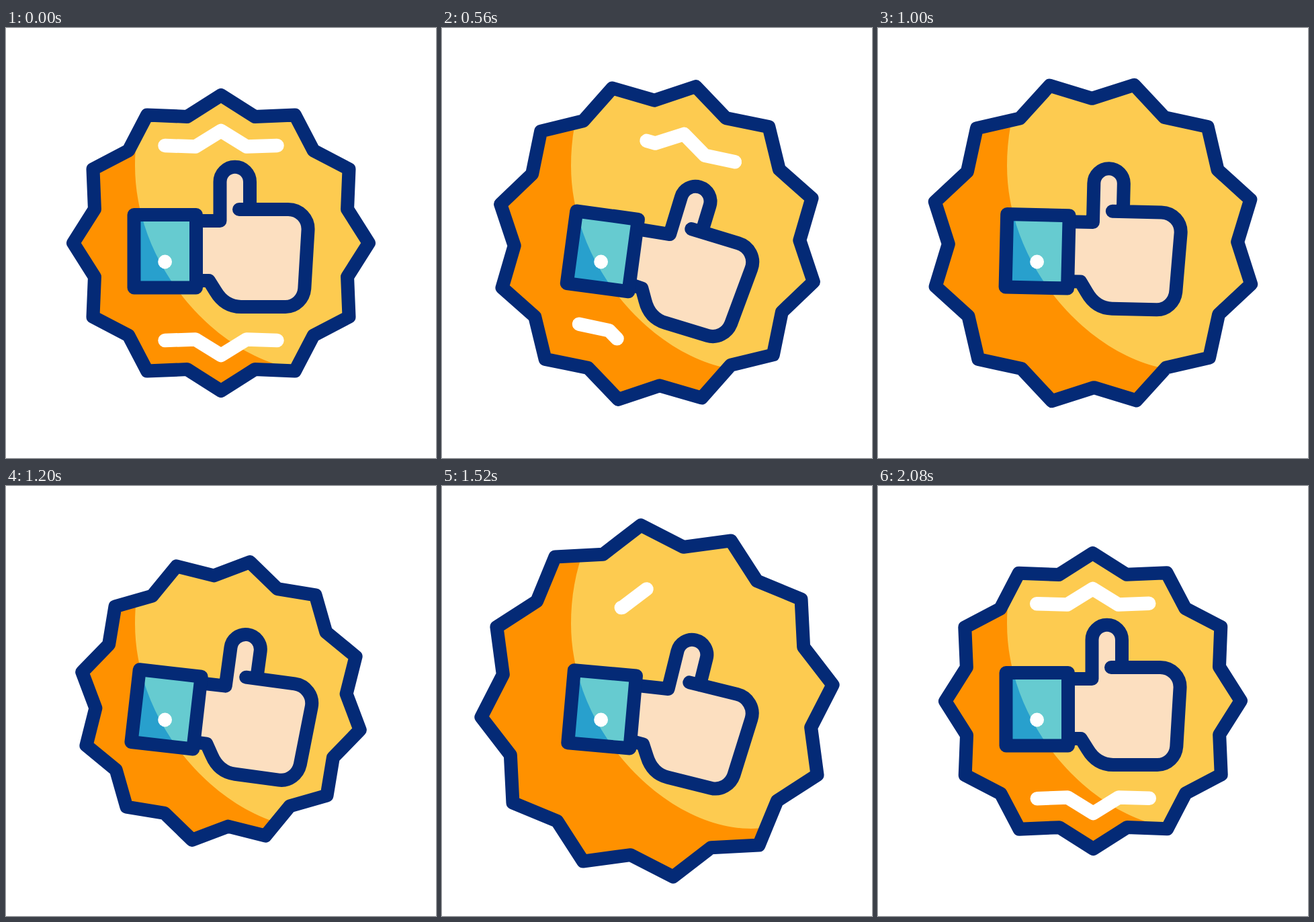
Write an HTML page that moves like this. It is 640 px wide and 640 px high and loops after 2240 ms.

```html
<!DOCTYPE html>
<html lang="en">
<head>
<meta charset="utf-8">
<title>Thumbs up badge</title>
<style>
  html, body { margin: 0; width: 100%; height: 100%; overflow: hidden; background: #fff; }
  svg { display: block; width: 100vw; height: 100vh; }
  .line { fill: none; stroke: #042a76; stroke-width: 20; stroke-linecap: round; stroke-linejoin: round; }
  .zigzag { fill: none; stroke: #fff; stroke-width: 20.5; stroke-linecap: round; stroke-linejoin: round; }
</style>
</head>
<body>
<svg viewBox="0 0 640 640">
  <defs>
    <path id="light" d="M240 40C205 90 192 150 192 205C192 368 335 510 460 510C485 510 505 504 520 492L640 420V0H270Z"/>
    <clipPath id="badgeClip"><path id="badgeMask"/></clipPath>
    <clipPath id="cuffClip"><rect id="cuffMask" x="190.5" y="278" width="92.5" height="108.5"/></clipPath>
  </defs>

  <g clip-path="url(#badgeClip)">
    <rect width="640" height="640" fill="#ff9100"/>
    <use href="#light" fill="#fdcb50"/>
  </g>
  <g id="zigzags">
    <path id="topZigzag" class="zigzag"/>
    <path id="bottomZigzag" class="zigzag"/>
  </g>
  <path id="badgeLine" class="line"/>

  <path id="handFill" fill="#fcdfc0"/>
  <path id="handLine" class="line"/>

  <g clip-path="url(#cuffClip)">
    <rect width="640" height="640" fill="#28a0cd"/>
    <use href="#light" fill="#66cbd0"/>
  </g>
  <rect id="cuffLine" class="line" x="190.5" y="278" width="92.5" height="108.5"/>
  <circle cx="236.6" cy="348" r="10.4" fill="#fff"/>
</svg>

<script>
const LOOP = 2240;
const CENTER = 320;
const NOD_PERIOD = 880;
const BUTTON = [236.6, 348];
const WRIST = [284, 378];

const $ = id => document.getElementById(id);
const clamp = v => Math.min(1, Math.max(0, v));
const smooth = p => p * p * (3 - 2 * p);
const ramp = (t, from, to) => smooth(clamp((t - from) / (to - from)));

// Keys are [time, value] pairs, eased between neighbours.
function track(t, keys) {
  let value = keys[0][1];
  for (let i = 1; i < keys.length; i++) {
    value += (keys[i][1] - keys[i - 1][1]) * ramp(t, keys[i - 1][0], keys[i][0]);
  }
  return value;
}

// Cubic Bezier easing with flat ends and horizontal handles at a and b.
function bezierEase(x, a, b) {
  let low = 0, high = 1;
  for (let i = 0; i < 30; i++) {
    const s = (low + high) / 2, r = 1 - s;
    if (3 * a * s * r * r + 3 * b * s * s * r + s ** 3 < x) low = s; else high = s;
  }
  return smooth(low);
}

const spin = t => 360 * bezierEase(clamp((t - 143) / 1980), 0.72, 0.28);
const pulse = t => track(t, [[0, 1], [350, 0.96], [800, 1.25], [1200, 0.96], [1645, 1.25], [2040, 1]]);

function rotate([x, y], [cx, cy], degrees) {
  const a = degrees * Math.PI / 180, c = Math.cos(a), s = Math.sin(a);
  return [cx + (x - cx) * c - (y - cy) * s, cy + (x - cx) * s + (y - cy) * c];
}

const toPath = points => "M" + points.map(p => p.map(v => v.toFixed(2)).join(" ")).join("L");

function starPath(scale, degrees) {
  const points = [];
  for (let i = 0; i < 24; i++) {
    const radius = (i % 2 ? 194.7 : 220) * scale;
    points.push(rotate([CENTER, CENTER - radius], [CENTER, CENTER], i * 15 + degrees));
  }
  return toPath(points) + "Z";
}

const topPoints = [[403.5, 175], [358, 176.5], [320, 153], [282, 176.5], [236.5, 175]];
const bottomPoints = [...topPoints].reverse().map(([x, y]) => [x, 640 - y]);

// Keeps the first part of a polyline.
function partialPath(points, amount) {
  if (amount <= 0.001) return "";
  const kept = [points[0]];
  const reach = amount * (points.length - 1);
  for (let i = 1; i < points.length; i++) {
    const part = clamp(reach - i + 1);
    if (part <= 0) break;
    const [a, b] = [points[i - 1], points[i]];
    kept.push([a[0] + (b[0] - a[0]) * part, a[1] + (b[1] - a[1]) * part]);
  }
  return toPath(kept);
}

function drawHand(cuffAngle, bend) {
  const onCuff = (x, y) => rotate([x, y], BUTTON, cuffAngle);
  const onHand = (x, y) => onCuff(...rotate([x, y], WRIST, bend));
  const at = (...xy) => {
    const out = [];
    for (let i = 0; i < xy.length; i += 2) out.push(onHand(xy[i], xy[i + 1]).map(v => v.toFixed(2)).join(" "));
    return out.join(" ");
  };
  const start = onCuff(283, 287 + bend * 0.6).join(" ");
  const end = onCuff(287, 376).join(" ");
  const thumb = `M${start}L${at(318.5, 287)}L${at(318.5, 229)}` +
    `A22.2 22.2 0 0 1 ${at(363, 229)}L${at(363, 270)}`;
  const fist = `L${at(420, 270)}C${at(437, 270, 450.5, 284, 449.5, 301)}` +
    `L${at(444.3, 388)}C${at(443, 403, 431, 415, 416, 415)}` +
    `L${at(350, 415)}C${at(334, 415, 321, 407, 312, 392)}L${at(302, 376)}L${end}`;
  $("handFill").setAttribute("d", thumb + fist + "Z");
  $("handLine").setAttribute("d", `${thumb}M${at(347, 270)}${fist}`);
}

function draw(t) {
  const angle = spin(t);
  const star = starPath(pulse(t), angle);
  $("badgeMask").setAttribute("d", star);
  $("badgeLine").setAttribute("d", star);

  $("zigzags").setAttribute("transform", `rotate(${angle} ${CENTER} ${CENTER})`);
  const top = track(t, [[400, 1], [1000, 0], [1387, 0], [1787, 1]]);
  const bottom = track(t, [[170, 1], [815, 0], [1600, 0], [2000, 1]]);
  $("topZigzag").setAttribute("d", partialPath(topPoints, top));
  $("bottomZigzag").setAttribute("d", partialPath(bottomPoints, bottom));

  const nod = t < 2 * NOD_PERIOD ? t % NOD_PERIOD : 0;
  const cuffAngle = track(nod, [[0, 0], [480, 8.8], [835, 0]]);
  const bend = track(nod, [[240, 0], [600, 9.6], [835, 0]]);
  const turn = `rotate(${cuffAngle} ${BUTTON})`;
  $("cuffMask").setAttribute("transform", turn);
  $("cuffLine").setAttribute("transform", turn);
  drawHand(cuffAngle, bend);
}

let startTime;
function tick(now) {
  startTime ??= now;
  draw((now - startTime) % LOOP);
  requestAnimationFrame(tick);
}
draw(0);
requestAnimationFrame(tick);
</script>
</body>
</html>
```
